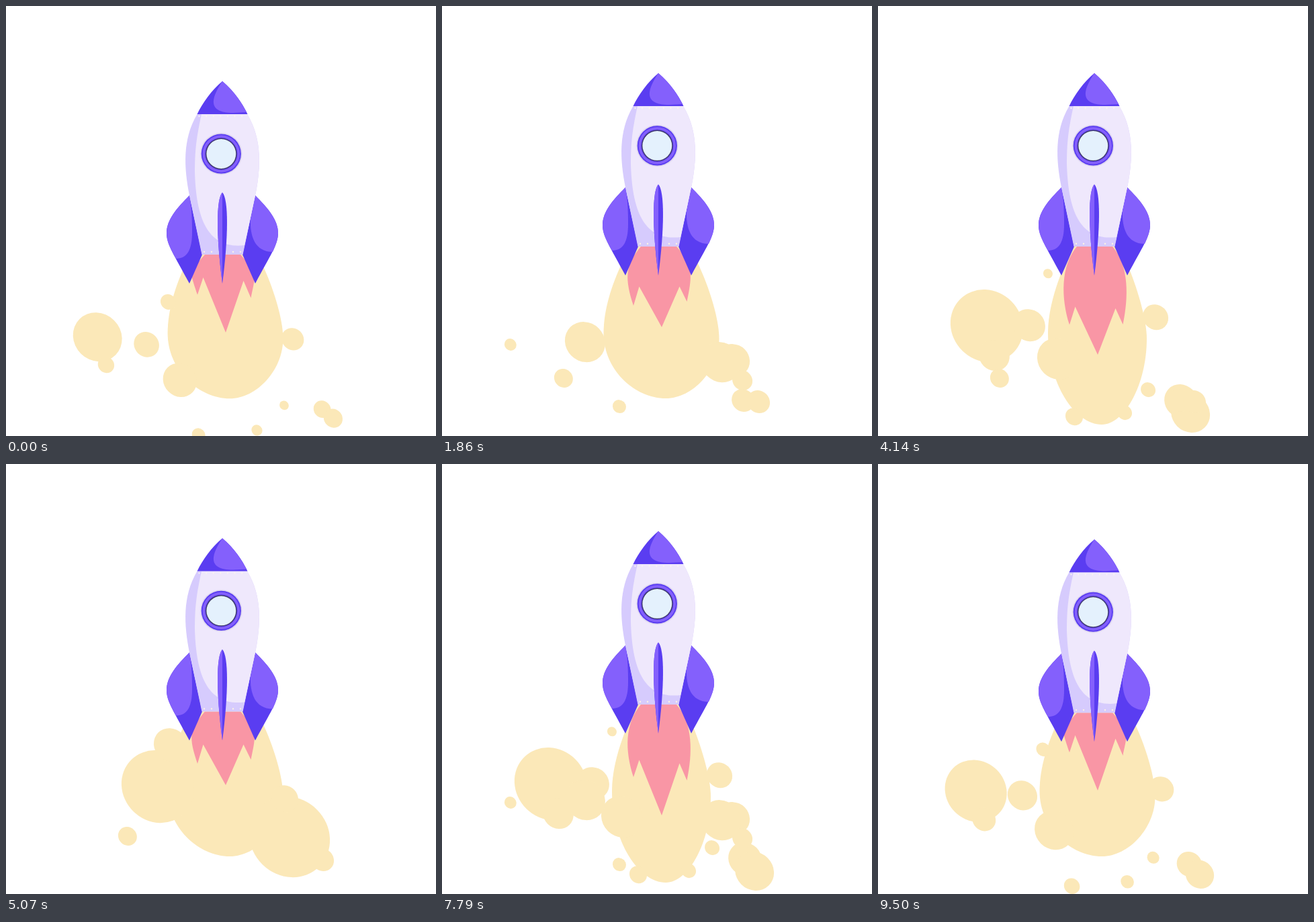
These frames come from a looping animation (640x640 px, 9.57 s). An HTML page with a canvas:

```html
<!DOCTYPE html>
<html lang="en">
<head>
<meta charset="utf-8">
<title>Rocket</title>
<style>
html, body { margin: 0; height: 100%; overflow: hidden; background: #fff; }
canvas { display: block; }
</style>
</head>
<body>
<canvas id="stage" width="640" height="640"></canvas>
<script>
const ctx = document.getElementById('stage').getContext('2d');
const LOOP = 9570, STEP = 71.4, AXIS = 326;
const DARK = '#5a3df1', LIGHT = '#8460fc', SMOKE = '#fbe8b8', FLAME = '#f996a5';

// Clouds of puffs, each x, y, radius at age 0; drawCloud moves them by one rule.
const clouds = {
  a: [[162, 476, 54], [173, 520, 23], [225, 475, 24], [253, 398, 7], [413, 463, 19], [268, 525, 31],
    [402, 571, 11], [367, 605, 11], [292, 611, 13], [451, 588, 25], [465, 606, 29]],
  b: [[213, 500, 30], [102, 504, 9], [264, 596, 10], [434, 527, 24], [415, 530, 30], [447, 557, 15]],
  c: [[181, 554, 14], [448, 587, 17], [471, 589, 17]],
  d: [[226, 480, 54], [245, 418, 25], [422, 555, 60], [415, 498, 20]]
};

// Between two beats the engine fires once: flame long, rocket up, the other clouds out.
const beats = [
  { time: -190, drop: 1, stretch: 0, notch: 0, puffs: 'a' },
  { time: 1860, drop: 0, stretch: 0, notch: 1, puffs: 'bc' },
  { time: 3210, drop: .04, stretch: 0, notch: 0, puffs: 'bd' },
  { time: 5070, drop: .84, stretch: 0, notch: 1, puffs: 'cd' },
  { time: 6430, drop: 1, stretch: 0, notch: 0, puffs: 'ac' },
  { time: 7790, drop: 0, stretch: 1, notch: 0, puffs: 'ab' }
];
beats.push({ ...beats[0], time: beats[0].time + LOOP });

const clamp = v => Math.max(0, Math.min(1, v));

function fill(color, path) {
  ctx.fillStyle = color;
  ctx.fill(new Path2D(path));
}

function disc(color, x, y, r, skew = 0) {
  ctx.fillStyle = color;
  ctx.beginPath();
  ctx.ellipse(x, y, r * (1 + skew), r * (1 - skew), Math.PI / 4, 0, 2 * Math.PI);
  ctx.fill();
}

// Puffs drift away from the axis and sink; the nearer and higher, the faster they sink and grow.
function drawCloud(name, t, start) {
  const age = ((t - start + 1.5 * LOOP) % LOOP - LOOP / 2) / STEP;
  const life = clamp(Math.min(age + 5, 7 - age) / 4);
  if (!life) return;
  for (const [x, y, r] of clouds[name]) {
    const sink = 17 - Math.abs(x - AXIS) / 14 + (500 - y) / 25;
    const size = (r + (sink / 2.5 - 4) * age - .035 * r * age * age) * life;
    if (size > 0) disc(SMOKE, x + (x - AXIS) / 17 * age, y + sink * age, size, .04);
  }
}

function drawSmoke(t, stretch) {
  const half = 86 - 12.5 * stretch, bottom = 584 + 39 * stretch;
  const l = 326.5 - half, r = 326.5 + half, low = 490 + .55 * (bottom - 490);
  fill(SMOKE, `M322 300C${l + 45} 340 ${l} 420 ${l} 487C${l} ${low} ${330 - half / 2} ${bottom} 333 ${bottom}
    C${330 + half / 2} ${bottom} ${r} ${low} ${r} 495C${r} 450 ${r - 37} 345 322 300Z`);
  beats.slice(1).forEach((beat, i) => {
    const previous = beats[i];
    for (const name in clouds) {
      if (beat.puffs.includes(name)) drawCloud(name, t, beat.time);
      if (!previous.puffs.includes(name)) drawCloud(name, t, (previous.time + beat.time) / 2);
    }
  });
}

function drawFlame(top, stretch, notch) {
  const long = 37 * stretch;
  const tip = 486 + long - 8 * notch;
  const dentL = 403.5 + long + 14 * notch, dentR = 408.5 + long + 9 * notch;
  const toothL = 429 + long + 17 * notch, toothR = 434 + long + 6 * notch;
  fill(FLAME, `M296 ${top}C272 ${top + 28} 272 ${toothL - 40} 285 ${toothL}L293.5 ${dentL}
    L327 ${tip}L353.5 ${dentR}L364.5 ${toothR}C373 ${toothR - 40} 374 ${top + 28} 349 ${top}Z`);
}

function drawRocket() {
  // side fins
  fill(DARK, 'M273 270C255 288 239 306 239 326C239 343 250 358 273 401L292 358Z');
  fill(LIGHT, 'M273 270C277 290 277 315 277 325C277 350 270 364 253 364C243 346 239 338 239 326C239 306 255 288 273 270Z');
  fill(DARK, 'M371 270C389 288 405 306 405 326C405 343 394 358 371 401L352 358Z');
  fill(LIGHT, 'M371 270C389 288 405 306 405 326Q405 337 397 354C370 354 363 330 364 305Z');
  // body
  fill('#d6cbfd', 'M284.5 149C262 187 265 230 273 270L291.5 358H352.5L371 270C379 230 382 187 359 149Z');
  fill('#efe8fc', 'M291 149C283 185 281 205 281 235C283 310 303 350 355 344L371 270C379 230 382 187 359 149Z');
  for (let x = 287.5; x < 358; x += 10.6) disc('#fbf4f0', x, 152, 1.1);
  for (const x of [-27, -16, 16, 27]) disc('#fdf3e2', 322 + x, 353.8, 1.2);
  // nose
  fill(DARK, 'M322 100C340 115 352 133 359.5 149H284.5C292 133 306 113 322 100Z');
  fill(LIGHT, 'M322 100C306 124 298 147 338 147L358 146C351 133 340 115 322 100Z');
  // porthole
  [['#ddd5ee', 31.2], [DARK, 29.6], [LIGHT, 27.7], [DARK, 24.2], ['#433d70', 23.4], ['#e4f1fd', 21.9]]
    .forEach(([color, r]) => disc(color, 320.3, 207.9, r));
  // centre fin
  fill(DARK, 'M322 265.5C331.3 275 331.3 330 322 401C312.7 330 312.7 275 322 265.5Z');
  fill(LIGHT, 'M322 265.5C312.7 275 312.7 330 322 401Z');
}

function draw(now) {
  const t = (now - beats[0].time) % LOOP + beats[0].time;
  const next = beats.findIndex(beat => beat.time > t);
  const from = beats[next - 1], to = beats[next];
  const u = (t - from.time) / (to.time - from.time);
  const blend = key => from[key] + (to[key] - from[key]) * u * u * (3 - 2 * u);
  const thrust = Math.sin(Math.PI * u) ** 4;
  const stretch = Math.max(blend('stretch'), thrust);
  const drop = 12.5 * blend('drop') * (1 - thrust);

  ctx.fillStyle = '#fff';
  ctx.fillRect(0, 0, 640, 640);
  drawSmoke(t, stretch);
  drawFlame(358 + drop, stretch, blend('notch'));
  ctx.save();
  ctx.translate(0, drop);
  drawRocket();
  ctx.restore();
}

const begin = performance.now();
function tick() {
  draw(performance.now() - begin);
  requestAnimationFrame(tick);
}
tick();
</script>
</body>
</html>
```
